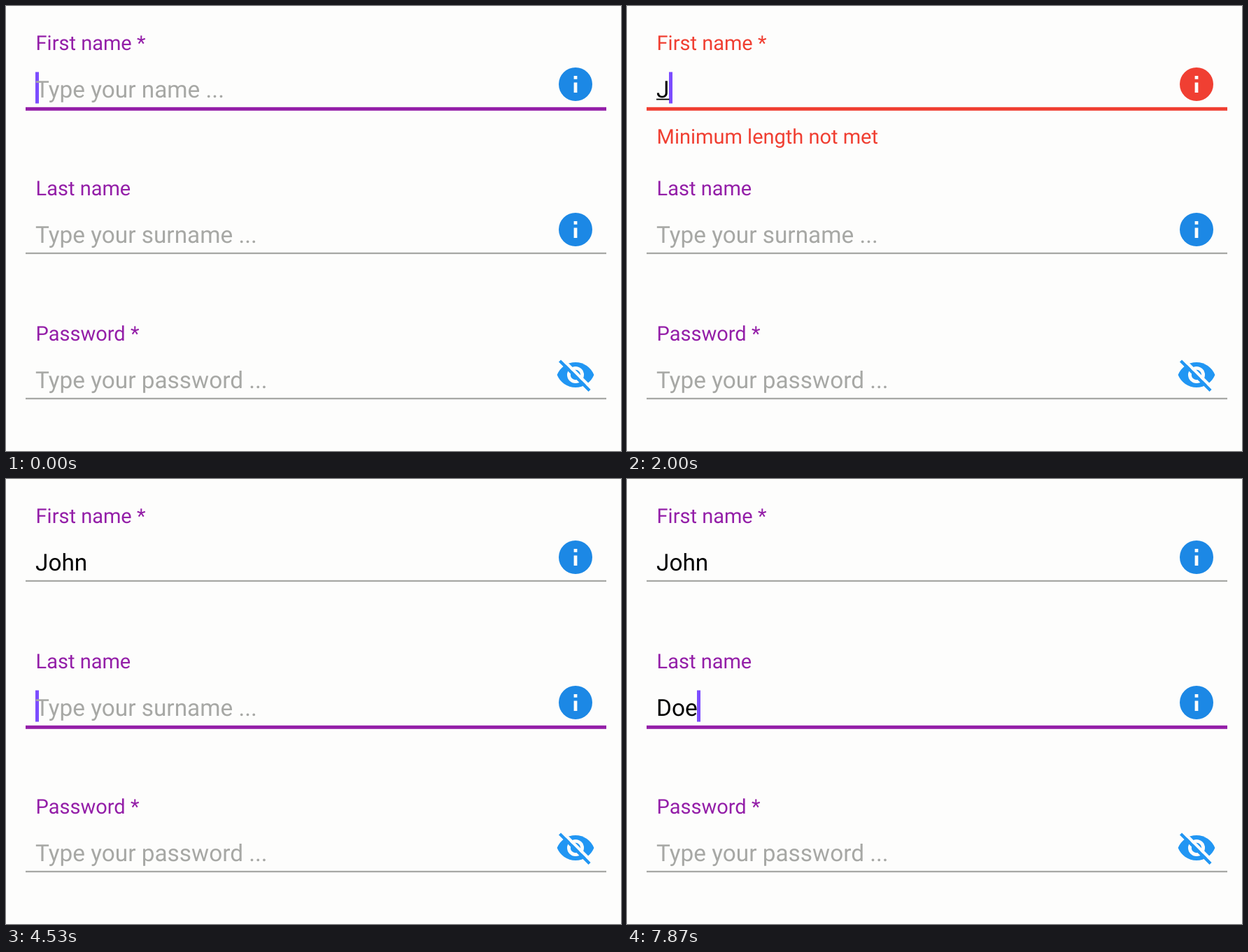
An HTML page for the animation above (8 s loop, 879 px wide and 637 px high).

```html
<!DOCTYPE html>
<html lang="en">
<head>
<meta charset="utf-8">
<title>Form validation</title>
<style>
  html, body { margin: 0; width: 100%; height: 100%; overflow: hidden; background: #fdfdfc; }
  svg { display: block; width: 879px; height: 637px; font-family: Roboto, sans-serif; text-rendering: geometricPrecision; }
  .label, .error { font-size: 29px; }
  .value { font-size: 33.36px; white-space: pre; }
</style>
</head>
<body>
<svg id="stage" viewBox="0 0 879 637"></svg>
<script>
const LOOP = 8000;
const PAPER = '#fdfdfc', PURPLE = '#941fa8', RED = '#f03f32', BLUE = '#1c88e5', EYE = '#2196f3';
const GREY = '#a7a8a5', CARET = '#7c4dff', INK = '#000';
const LEFT = 42, LABEL_LEFT = 42.6;

// Each track lists [start in ms, value]; a value holds until the next entry.
const focusTrack = [[0, 0], [4370, 1]];
const caretTrack = [[0, 1], [130, 0], [630, 1], [1130, 0], [1630, 1], [3130, 0], [3670, 1], [4170, 0],
  [4370, 1], [4870, 0], [5400, 1], [6200, 0], [6670, 1]];
const fields = [
  { label: 'First name *', hint: 'Type your name ...',
    text: [[0, ''], [1790, 'J'], [2130, 'Jo'], [2370, 'Joh'], [2660, 'John']],
    composing: [[0, 1], [4370, 0]],
    error: [[0, ''], [1860, 'Minimum length not met'], [2430, '']] },
  { label: 'Last name', hint: 'Type your surname ...',
    text: [[0, ''], [5450, 'D'], [5590, 'Do'], [5700, 'Doe'], [7000, 'Doe1'], [7530, 'Doe']],
    composing: [[0, 1], [6400, 0]],
    error: [[0, ''], [7070, 'Only letters allowed'], [7600, '']] },
  { label: 'Password *', hint: 'Type your password ...',
    text: [[0, '']], composing: [[0, 0]], error: [[0, '']] }
];

const stage = document.getElementById('stage');

function add(parent, tag, attrs = {}, text = '') {
  const el = document.createElementNS('http://www.w3.org/2000/svg', tag);
  set(el, attrs);
  el.textContent = text;
  return parent.appendChild(el);
}

function set(el, attrs) {
  for (const key in attrs) el.setAttribute(key, attrs[key]);
}

function valueAt(track, t) {
  let value = track[0][1];
  for (const [start, next] of track) if (t >= start) value = next;
  return value;
}

function iconGroup(parent) {
  return add(parent, 'g', { transform: 'translate(785.2 83.2) scale(2.4)' });
}

function infoIcon(parent) {
  const g = iconGroup(parent);
  const disc = add(g, 'circle', { cx: 12, cy: 12, r: 10 });
  add(g, 'path', { d: 'M11 7h2v2h-2zM11 11h2v6h-2z', fill: PAPER });
  return disc;
}

function hiddenEyeIcon(parent) {
  const g = iconGroup(parent);
  add(g, 'path', { fill: EYE, d: 'M1 12C2.73 7.61 7 4.5 12 4.5s9.27 3.11 11 7.5c-1.73 4.39-6 7.5-11 7.5S2.73 16.39 1 12z' });
  add(g, 'circle', { cx: 12, cy: 12, r: 5, fill: PAPER });
  add(g, 'circle', { cx: 12, cy: 12, r: 3, fill: EYE });
  add(g, 'path', { d: 'M5 3.45l17 17', stroke: PAPER, 'stroke-width': 1.8 });
  add(g, 'path', { d: 'M2.63 3.63l17.73 17.73', stroke: EYE, 'stroke-width': 1.8 });
}

fields.forEach((field, i) => {
  const g = add(stage, 'g', { transform: `translate(0 ${i * 208})` });
  field.title = add(g, 'text', { class: 'label', x: LABEL_LEFT, y: 63 }, field.label);
  field.caret = add(g, 'rect', { y: 94.5, width: 5, height: 45, fill: CARET });
  field.value = add(g, 'text', { class: 'value', x: LEFT, y: 131 });
  field.mark = add(g, 'rect', { x: LEFT, y: 132.7, height: 1.8, fill: INK });
  field.rule = add(g, 'rect', { x: 28, y: 144.8, width: 830 });
  field.note = add(g, 'text', { class: 'error', x: LABEL_LEFT, y: 197, fill: RED });
  if (i < 2) field.disc = infoIcon(g);
  else hiddenEyeIcon(g);
});

const touch = add(stage, 'circle', { cx: 518, cy: 134.5, r: 27, fill: '#fff', 'fill-opacity': .25,
  stroke: '#dfdff2', 'stroke-width': 2.5 });

function drawField(field, t, focused) {
  const text = valueAt(field.text, t);
  const error = valueAt(field.error, t);
  const accent = error ? RED : PURPLE;
  field.value.textContent = text || field.hint;
  const width = text ? field.value.getComputedTextLength() : 0;
  set(field.value, { fill: text ? INK : GREY });
  set(field.title, { fill: accent });
  set(field.rule, { fill: focused ? accent : GREY, height: focused ? 5 : 2.3 });
  set(field.mark, { width: valueAt(field.composing, t) ? width : 0 });
  set(field.caret, { x: LEFT + Math.floor(width), opacity: focused ? valueAt(caretTrack, t) : 0 });
  field.note.textContent = error;
  if (field.disc) set(field.disc, { fill: error ? RED : BLUE });
}

function draw(t) {
  const focus = valueAt(focusTrack, t);
  fields.forEach((field, i) => drawField(field, t, i === focus));
  const fade = t < 400 ? 0 : Math.min(1, (t - 400) / 70, (670 - t) / 140);
  set(touch, { opacity: Math.max(0, fade) });
}

const start = performance.now();
function tick() {
  draw((performance.now() - start) % LOOP);
  requestAnimationFrame(tick);
}
tick();
</script>
</body>
</html>
```
